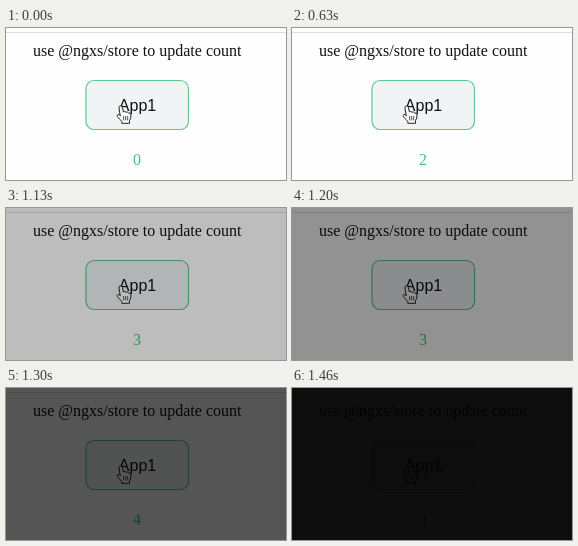
An HTML page that plays this animation: 280 by 152 pixels, repeating every 1600 ms.

```html
<!DOCTYPE html>
<html lang="en">
<head>
<meta charset="utf-8">
<title>Store counter</title>
<style>
  html, body { margin: 0; width: 100%; height: 100%; overflow: hidden; background: #fff; }
  svg { display: block; width: 280px; height: 152px; }
  text { text-anchor: middle; }
  .serif { font: 16px "Liberation Serif", serif; }
  .sans { font: 16px "Liberation Sans", sans-serif; }
</style>
</head>
<body>
<svg viewBox="0 0 280 152">
  <rect width="280" height="152" fill="#fefefe"/>
  <path d="M0 4.5H280" stroke="#dcdcdc"/>
  <text class="serif" x="131.2" y="28" fill="#111">use @ngxs/store to update count</text>
  <rect x="80" y="52.5" width="102.5" height="49" rx="8" fill="#f0f4f5" stroke="#5cc98a" stroke-width="1.2"/>
  <text class="sans" x="131.5" y="82.5" fill="#111">App1</text>
  <text class="serif" id="count" x="131" y="136.5" fill="#42c573">0</text>
  <g id="hand" stroke="#222" stroke-linejoin="round" stroke-linecap="round">
    <path fill="#fff" d="M114.2 87.5L113 80.2Q112.7 78 114.3 77.8T116.4 79.6L117.4 84Q118.7 82.5 120 84.3Q121.4 83.2 122.5 85Q124.6 84.3 125 87Q125.2 90.2 123.5 92.5V95.3H115.8V93.5Q114.2 91.6 111.6 88.8Q110.5 87.2 111.8 86.6T114.2 87.5Z"/>
    <path fill="none" stroke-width=".8" d="M117.7 88.5V92M119.7 88.5V92M121.7 88.5V92"/>
  </g>
  <rect id="shade" width="280" height="152" opacity="0"/>
</svg>
<script>
  const LOOP = 1600;
  const FRAME = 100 / 3;
  const countTimes = [60, 460, 860, 1260];
  const fade = [[1000, 0], [1130, .26], [1230, .5], [1330, .73], [1460, .945]];
  const count = document.getElementById("count");
  const shade = document.getElementById("shade");

  // The fade advances at 30 pictures per second, on whole centiseconds.
  const snap = t => Math.floor(Math.floor((t + 10) / FRAME) * FRAME / 10) * 10;

  function darkness(t) {
    if (t < 1030) return 0;
    const time = Math.min(snap(t), 1460);
    const i = Math.max(1, fade.findIndex(([end]) => time <= end));
    const [t0, a] = fade[i - 1], [t1, b] = fade[i];
    return a + (b - a) * (time - t0) / (t1 - t0);
  }

  function draw(now) {
    const t = now % LOOP;
    count.textContent = countTimes.filter(start => t >= start).length;
    shade.setAttribute("opacity", darkness(t));
  }

  let start;
  function tick(now) {
    start ??= now;
    draw(now - start);
    requestAnimationFrame(tick);
  }
  draw(0);
  requestAnimationFrame(tick);
</script>
</body>
</html>
```
